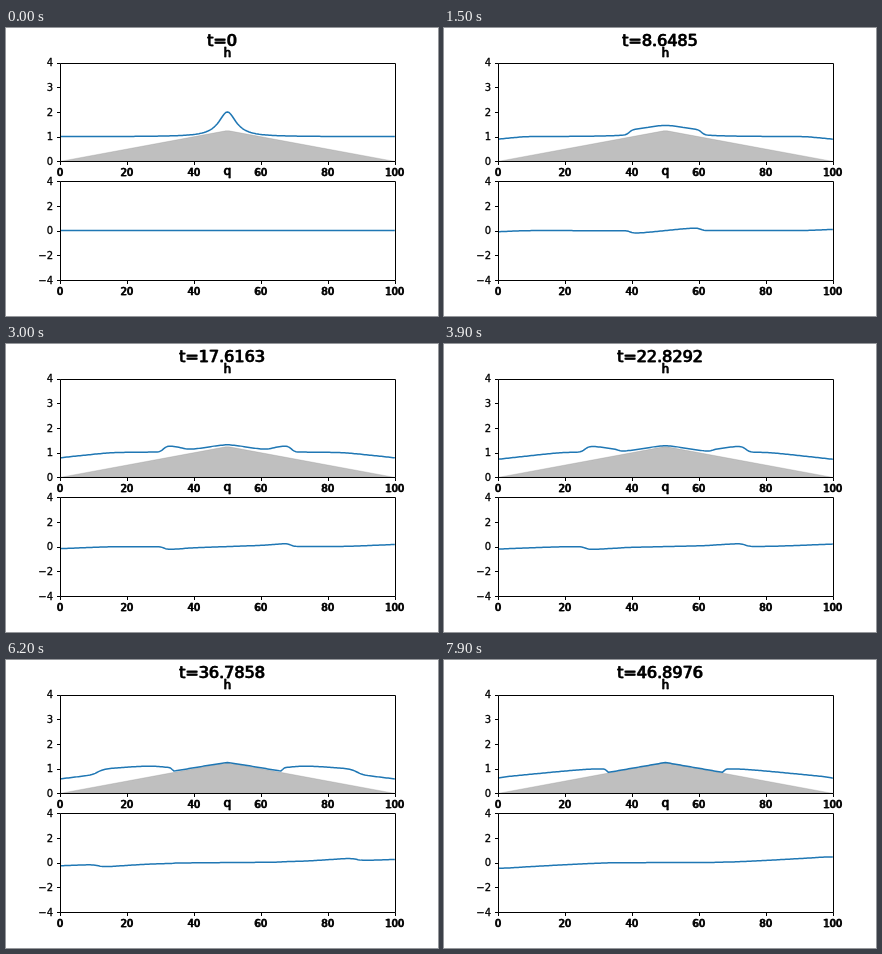
Write an HTML page that moves like this. It is 432x288 px and loops after 8000 ms.

```html
<!DOCTYPE html>
<html lang="en">
<head>
<meta charset="utf-8">
<title>Water over a ridge</title>
<style>
  html, body { margin: 0; width: 100%; height: 100%; overflow: hidden; background: #fff; }
  svg { display: block; width: 432px; height: 288px; }
  text { font-family: "DejaVu Sans", Verdana, sans-serif; stroke: #000; stroke-width: .3px; }
  .axis { fill: none; stroke: #000; stroke-width: 1; }
  .curve { fill: none; stroke: #1f77b4; stroke-width: 1.5; stroke-linejoin: round; }
  .bed { fill: #808080; fill-opacity: .5; stroke: #808080; stroke-opacity: .5; stroke-width: .5; }
</style>
</head>
<body>
<svg viewBox="0 0 432 288"></svg>
<script>
const svg = document.querySelector('svg');
const FRAMES = 80, FRAME_MS = 100;
const LEFT = 54, WIDTH = 334.8, HEIGHT = 98.84;
const levelPanel = { top: 34.56, min: 0, max: 4, tick: 1 };
const flowPanel = { top: 153.16, min: -4, max: 4, tick: 2 };

// Simulated time at a few animation steps, linear in between.
const clock = [[0, 0], [15, 8.6485], [30, 17.6163], [39, 22.8292], [48, 28.2579], [62, 36.7858], [79, 46.8976]];

function timeAt(step) {
  const i = Math.max(1, clock.findIndex(([s]) => s >= step));
  const [s0, t0] = clock[i - 1], [s1, t1] = clock[i];
  return t0 + (t1 - t0) * (step - s0) / (s1 - s0);
}

// Shallow water with unit gravity: depth h and discharge q over a ridge.
const DX = 0.5, CELLS = 201, SUBSTEPS = 4;
const bed = x => 1.25 - 0.025 * Math.abs(x - 50);
const bump = x => 1 + 1 / (1 + 0.1 * (x - 50) ** 2);
const grid = Array.from({ length: CELLS }, (_, i) => i * DX);
const padded = a => [a[0], ...a, a[a.length - 1]];
const paddedBed = [-DX, ...grid, 100 + DX].map(bed);

// HLL flux with hydrostatic reconstruction, so still water stays still.
function interfaceFlux(hA, qA, bA, hB, qB, bB) {
  const b = Math.max(bA, bB);
  const hl = Math.max(0, hA + bA - b), hr = Math.max(0, hB + bB - b);
  const ul = hA > 1e-6 ? qA / hA : 0, ur = hB > 1e-6 ? qB / hB : 0;
  const cl = Math.sqrt(hl), cr = Math.sqrt(hr);
  const sl = Math.min(0, ul - cl, ur - cr), sr = Math.max(0, ul + cl, ur + cr);
  const hll = (fl, fr, vl, vr) => (sr * fl - sl * fr + sl * sr * (vr - vl)) / (sr - sl || 1);
  const mass = hll(hl * ul, hr * ur, hl, hr);
  const push = hll(hl * ul * ul + hl * hl / 2, hr * ur * ur + hr * hr / 2, hl * ul, hr * ur);
  return { mass, left: push + (hA * hA - hl * hl) / 2, right: push + (hB * hB - hr * hr) / 2 };
}

function advance({ h, q }, dt) {
  const H = padded(h), Q = padded(q), b = paddedBed, k = dt / DX;
  const flux = [];
  for (let i = 0; i <= CELLS; i++)
    flux.push(interfaceFlux(H[i], Q[i], b[i], H[i + 1], Q[i + 1], b[i + 1]));
  return {
    h: h.map((v, i) => Math.max(0, v - k * (flux[i + 1].mass - flux[i].mass))),
    q: q.map((v, i) => v - k * (flux[i + 1].left - flux[i].right))
  };
}

function simulate() {
  let state = { h: grid.map(x => bump(x) - bed(x)), q: grid.map(() => 0) };
  const states = [state];
  for (let step = 1; step < FRAMES; step++) {
    const dt = (timeAt(step) - timeAt(step - 1)) / SUBSTEPS;
    for (let n = 0; n < SUBSTEPS; n++) state = advance(state, dt);
    states.push(state);
  }
  return states;
}

const px = x => LEFT + x * WIDTH / 100;
const py = (panel, v) => panel.top + HEIGHT * (panel.max - v) / (panel.max - panel.min);
const snap = v => Math.floor(v + .5) + .5;

function add(tag, attrs, text = '') {
  const node = document.createElementNS('http://www.w3.org/2000/svg', tag);
  for (const name in attrs) node.setAttribute(name, attrs[name]);
  node.textContent = text;
  svg.append(node);
  return node;
}

const label = (text, x, y, anchor = 'end', size = 10) =>
  add('text', { x, y, 'text-anchor': anchor, 'font-size': size }, text);

// Centred text is overprinted with a slight shift.
const overprint = (text, x, y, size) =>
  [-.4, .4].map(shift => label(text, x + shift, y, 'middle', size));

function drawAxes(panel, title) {
  const bottom = panel.top + HEIGHT;
  const x0 = snap(LEFT), x1 = snap(LEFT + WIDTH), y0 = snap(panel.top), y1 = snap(bottom);
  let d = `M${x0} ${y0}H${x1}V${y1}H${x0}Z`;
  for (let x = 0; x <= 100; x += 20) {
    d += `M${snap(px(x))} ${y1}v3.5`;
    overprint(x, px(x), Math.round(bottom + 14.6), 10);
  }
  for (let v = panel.min; v <= panel.max; v += panel.tick) {
    const y = py(panel, v);
    d += `M${x0} ${snap(y)}h-3.5`;
    label(String(v).replace('-', '\u2212'), 47, Math.round(y + 3.8));
  }
  add('path', { class: 'axis', d });
  overprint(title, 221.4, Math.round(panel.top - 6), 12);
}

const tracePath = (panel, points) =>
  'M' + points.map(([x, v]) => `${px(x).toFixed(2)} ${py(panel, v).toFixed(2)}`).join('L');

const ridge = [0, 49.5, 50.5, 100].map(x => [x, bed(x)]);
add('path', { class: 'bed', d: tracePath(levelPanel, ridge) + 'Z' });
const levelCurve = add('path', { class: 'curve' });
const flowCurve = add('path', { class: 'curve' });
drawAxes(levelPanel, 'h');
drawAxes(flowPanel, 'q');
const heading = overprint('', 216, 18, 16);

const states = simulate();

function draw(step) {
  const { h, q } = states[step];
  levelCurve.setAttribute('d', tracePath(levelPanel, grid.map((x, i) => [x, h[i] + bed(x)])));
  flowCurve.setAttribute('d', tracePath(flowPanel, grid.map((x, i) => [x, q[i]])));
  for (const node of heading) node.textContent = 't=' + Number(timeAt(step).toFixed(4));
}

const start = performance.now();
let shown = -1;
function tick() {
  const step = Math.floor((performance.now() - start) / FRAME_MS) % FRAMES;
  if (step !== shown) draw(shown = step);
  requestAnimationFrame(tick);
}
tick();
</script>
</body>
</html>
```
